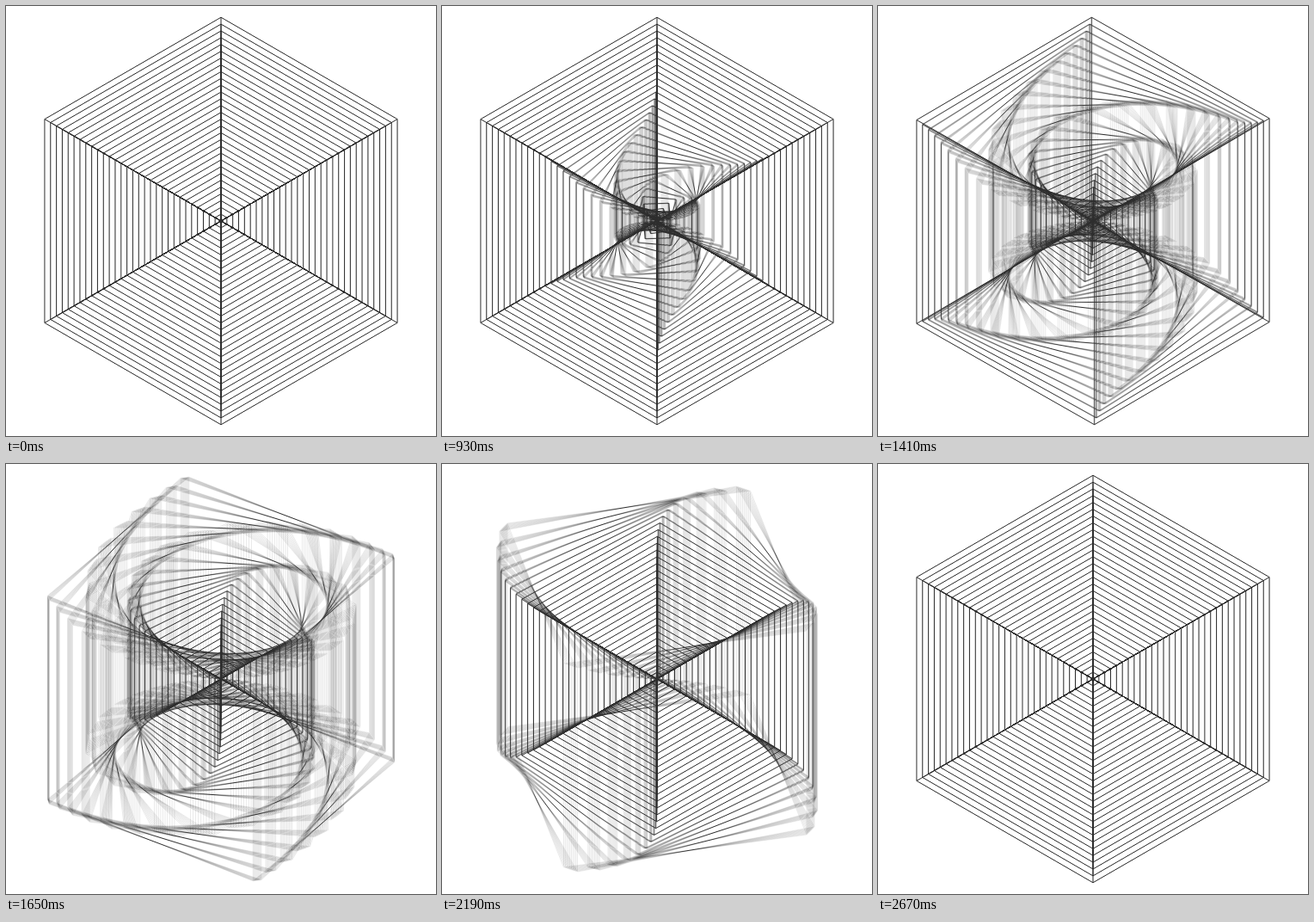
Recreate the animation shown at these times as an HTML page with a canvas. Size 500 by 500 pixels, loop 2700 ms.

```html
<!DOCTYPE html>
<html lang="en">
<head>
<meta charset="utf-8">
<title>Nested turning cubes</title>
<style>
  html, body { margin: 0; width: 100%; height: 100%; overflow: hidden; background: #fff; }
  canvas { display: block; width: 500px; height: 500px; }
</style>
</head>
<body>
<canvas id="stage" width="500" height="500"></canvas>
<script>
const SIZE = 500, LOOP = 2700, STEP = 30;
const CUBES = 30, RADIUS = 236.8;     // outermost hexagon radius
const TURN = 1410;                    // time one cube needs for its half turn
const DELAY = (LOOP - TURN) / (CUBES - 1);
const POWER = 3.2, SAMPLES = 10;      // easing strength, motion blur samples
const INK = 50;

const ctx = document.getElementById('stage').getContext('2d');
const layer = document.createElement('canvas');
layer.width = layer.height = SIZE;
const pen = layer.getContext('2d');

const clamp = p => Math.min(1, Math.max(0, p));
const ease = p => p < 0.5
  ? 0.5 * Math.pow(2 * p, POWER)
  : 1 - 0.5 * Math.pow(2 * (1 - p), POWER);

// Isometric wire cube, turned about its vertical axis.
function addCube(r, angle) {
  const w = r * Math.sqrt(3) / 2, h = r / 2;
  const pts = [0, 1, 2, 3].map(j => {
    const a = angle + j * Math.PI / 2;
    return [SIZE / 2 - w * Math.sin(a), SIZE / 2 - h * Math.cos(a)];
  });
  for (const dy of [-h, h]) {
    pts.forEach(([x, y], j) => j ? pen.lineTo(x, y + dy) : pen.moveTo(x, y + dy));
    pen.closePath();
  }
  for (const [x, y] of pts) {
    pen.moveTo(x, y - h);
    pen.lineTo(x, y + h);
  }
}

// Light lines on black, so that samples can be summed.
function drawSample(t) {
  pen.fillStyle = '#000';
  pen.fillRect(0, 0, SIZE, SIZE);
  const c = 255 - INK;
  pen.strokeStyle = `rgb(${c},${c},${c})`;
  pen.lineWidth = 1;
  pen.lineJoin = 'round';
  pen.beginPath();
  for (let i = 0; i < CUBES; i++) {
    const p = clamp((t - i * DELAY) / TURN);
    addCube(RADIUS * (i + 1) / CUBES, Math.PI * ease(p));
  }
  pen.stroke();
}

function render(t) {
  ctx.globalCompositeOperation = 'source-over';
  ctx.globalAlpha = 1;
  ctx.fillStyle = '#000';
  ctx.fillRect(0, 0, SIZE, SIZE);
  ctx.globalCompositeOperation = 'lighter';
  ctx.globalAlpha = 1 / SAMPLES;
  for (let s = 0; s < SAMPLES; s++) {
    drawSample(t + STEP * s / SAMPLES);
    ctx.drawImage(layer, 0, 0);
  }
  // Invert to dark lines on white.
  ctx.globalCompositeOperation = 'difference';
  ctx.globalAlpha = 1;
  ctx.fillStyle = '#fff';
  ctx.fillRect(0, 0, SIZE, SIZE);
}

let shown = -1;
function tick() {
  const t = Math.floor(((performance.now() + 0.5) % LOOP) / STEP) * STEP;
  if (t !== shown) render(shown = t);
  requestAnimationFrame(tick);
}
tick();
</script>
</body>
</html>
```
